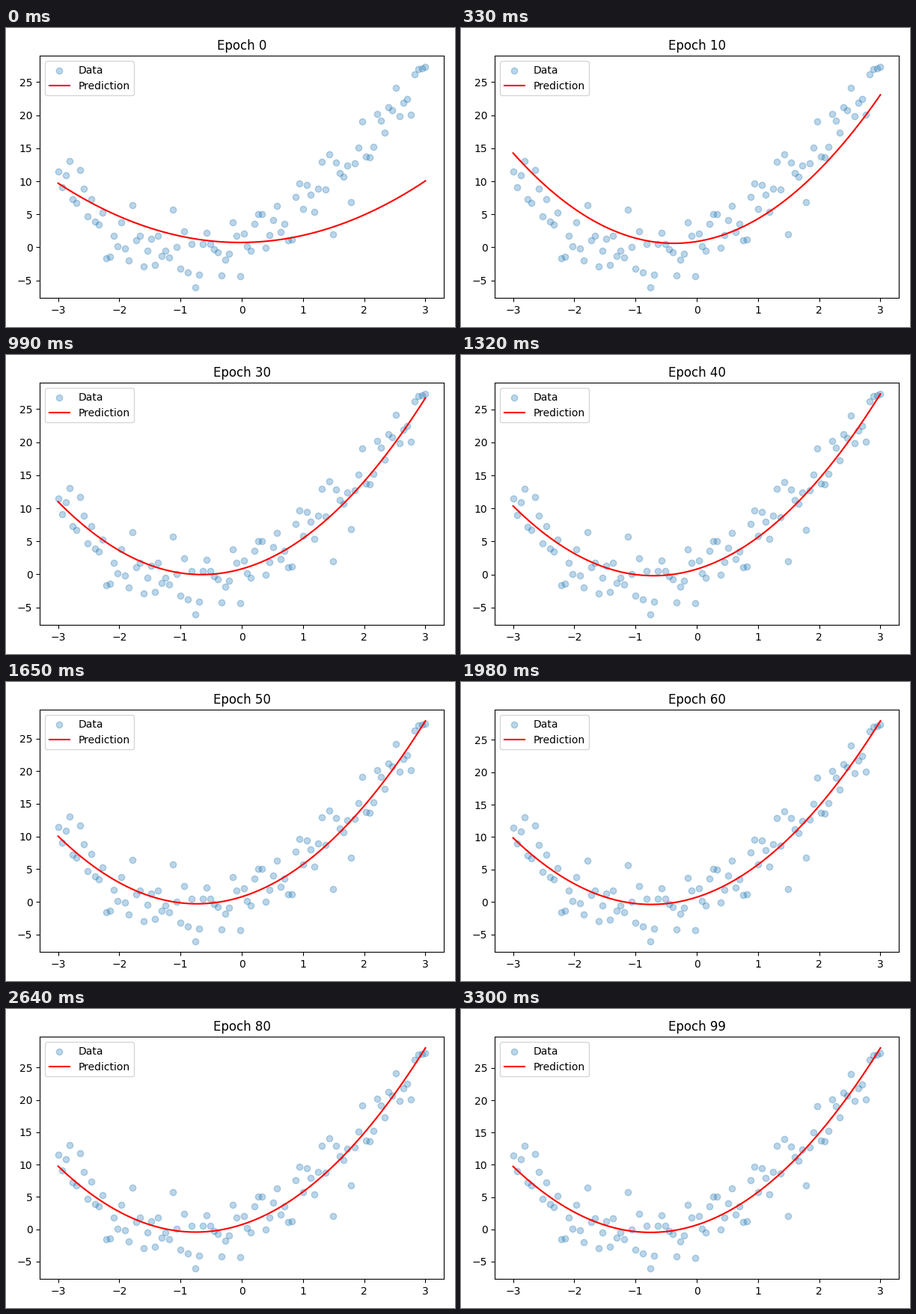
A matplotlib script that plays this animation: 600 px wide and 400 px high, repeating every 3.63 s.

```python
import numpy as np
import matplotlib.pyplot as plt
from matplotlib.animation import FuncAnimation

SEED = 42
RATE = 0.01
EPOCHS = [*range(0, 100, 10), 99]

x = np.linspace(-3, 3, 100)
y = 2 * x**2 + 3 * x + 1 + 3 * np.random.RandomState(SEED).randn(100)
basis = np.column_stack([x**2, x, np.ones_like(x)])


def train():
    """Gradient descent on a quadratic; returns the weights after each epoch."""
    weights = np.random.RandomState(SEED).randn(3)
    history = []
    for _ in range(EPOCHS[-1] + 1):
        error = basis @ weights - y
        weights = weights - RATE * 2 * basis.T @ error / len(x)
        history.append(weights)
    return history


history = train()
fig, ax = plt.subplots(figsize=(6, 4), dpi=100)


def draw(i):
    epoch = EPOCHS[i]
    ax.clear()
    ax.scatter(x, y, alpha=0.3, label="Data")
    ax.plot(x, basis @ history[epoch], color="red", label="Prediction")
    ax.set_title(f"Epoch {epoch}")
    ax.legend(loc="upper left")
    fig.tight_layout()


anim = FuncAnimation(fig, draw, frames=len(EPOCHS), interval=330,
                     repeat=True, repeat_delay=0)
plt.show()
```
